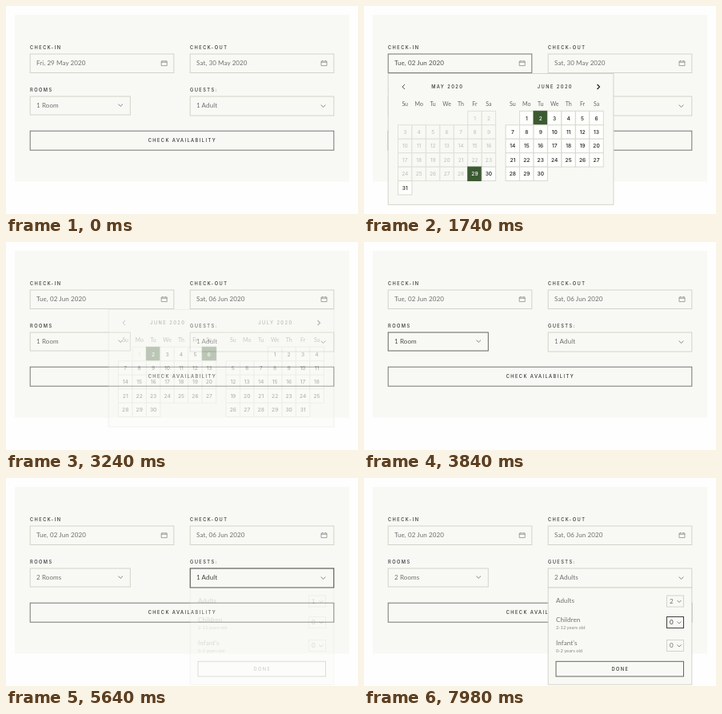
Write an HTML page that moves like this. It is 440 by 260 pixels and loops after 8000 ms.

```html
<!DOCTYPE html>
<html lang="en">
<head>
<meta charset="utf-8">
<title>Booking form</title>
<style>
html, body { margin: 0; width: 100%; height: 100%; overflow: hidden; background: #fefefe; }
svg { display: block; width: 100vw; height: 100vh; font-family: Lato, "Open Sans", sans-serif; }
.cap { font: 500 5.7px Inter, sans-serif; letter-spacing: 1.45px; fill: #333; }
.val { font-size: 8px; letter-spacing: .1px; fill: #707070; }
.sub { font-size: 5.8px; fill: #8a8a86; }
.wk { font-size: 7px; fill: #666; }
.day { font: 500 6.6px Inter, sans-serif; fill: #222; }
.off { font-weight: 400; fill: #bdbeb8; }
</style>
</head>
<body>
<svg id="stage" viewBox="0 0 440 260"></svg>
<script>
const LOOP = 8000;
const PAPER = '#f8f9f4', LINE = '#d2d4cb';
const GREEN = [59, 90, 49], WHITE = [254, 254, 252], GREY = [112, 112, 112];
const stage = document.getElementById('stage');

function el(parent, tag, attrs = {}, text) {
  const n = document.createElementNS('http://www.w3.org/2000/svg', tag);
  for (const k in attrs) n.setAttribute(k, attrs[k]);
  if (text !== undefined) n.textContent = text;
  parent.appendChild(n);
  return n;
}
const group = () => el(stage, 'g');
const box = (p, x, y, width, height, fill = PAPER, stroke = LINE) =>
  el(p, 'rect', { x, y, width, height, fill, stroke });
const label = (p, x, y, cls, s, anchor = 'start') =>
  el(p, 'text', { x, y, class: cls, 'text-anchor': anchor }, s);
const line = (p, d, stroke = '#777', width = .9) =>
  el(p, 'path', { d, fill: 'none', stroke, 'stroke-width': width });
const chevron = (p, x, y, r = 2.8) => line(p, `M${x - r} ${y - r / 2}l${r} ${r}l${r} ${-r}`);

function calIcon(x, y) {
  line(stage, `M${x} ${y}h7v5.6h-7zM${x} ${y + 1.3}h7M${x + 1.5} ${y - 1}v1M${x + 5.5} ${y - 1}v1`, '#808080', .7);
}

const mix = (a, b, k) => `rgb(${a.map((v, i) => Math.round(v + (b[i] - v) * k))})`;
const ramp = (t, from, to) => {
  const k = Math.min(1, Math.max(0, (t - from) / (to - from)));
  return k * k * (3 - 2 * k);
};
const pulse = (t, on, off, rise = 180, fall = rise) =>
  ramp(t, on, on + rise) - ramp(t, off, off + fall);

function show(n, k) {
  n.setAttribute('opacity', k.toFixed(3));
  n.setAttribute('visibility', k > 0 ? 'visible' : 'hidden');
}
function focus(f, k) {
  f.frame.setAttribute('stroke', mix([210, 212, 203], [64, 64, 64], k));
  f.text.style.fill = mix(GREY, [64, 64, 64], k);
}
const setText = (n, s) => { if (n.textContent !== s) n.textContent = s; };

function field(x, y, w, h, name) {
  label(stage, x, y - 6, 'cap', name);
  return { frame: box(stage, x + .2, y, w - .4, h), text: label(stage, x + 8, y + 14.1, 'val', '') };
}

// Two months side by side; returns the day cells by "month-day".
function calendar(x, rows, months) {
  const g = group(), cells = {}, step = 17.45;
  box(g, x + .2, 84.4, 281.7, rows * step + 59.2);
  line(g, `M${x + 21} 98l-3 3l3 3`, '#444');
  line(g, `M${x + 261.5} 98l3 3l-3 3`, '#222', 1.2);
  months.forEach((m, side) => {
    const x0 = x + 12.5 + side * 134.6;
    label(g, x0 + 61.8, 103.4, 'cap', m.name + ' 2020', 'middle');
    ['Su', 'Mo', 'Tu', 'We', 'Th', 'Fr', 'Sa'].forEach((d, i) =>
      label(g, x0 + (i + .5) * step, 124.8, 'wk', d, 'middle'));
    for (let d = 1; d <= m.days; d++) {
      const at = d - 1 + m.first, off = d < m.open;
      const cx = x0 + at % 7 * step, cy = 131.3 + Math.floor(at / 7) * step;
      cells[side + '-' + d] = {
        rect: box(g, cx, cy, step, step, off ? PAPER : mix(WHITE, GREEN, 0), off ? '#dfe0d8' : '#d8dad1'),
        text: label(g, cx + step / 2, cy + 11.2, off ? 'day off' : 'day', d, 'middle')
      };
    }
  });
  return { g, cells };
}

function tint(cell, k) {
  cell.rect.setAttribute('fill', mix(WHITE, GREEN, k));
  cell.rect.setAttribute('stroke', mix([216, 218, 209], GREEN, k));
  cell.text.style.fill = mix([34, 34, 34], [255, 255, 255], k);
}

// Open list of seven options, 14 px each.
function list(x, y, w, pad, options) {
  const g = group();
  box(g, x, y, w, 97.7, '#fefefd', '#c9cbc2');
  const rows = options.map((s, i) => ({
    rect: el(g, 'rect', { x: x + .5, y: y + .3 + i * 14, width: w - 1, height: 14 }),
    text: label(g, x + pad, y + 10 + i * 14, 'val', s)
  }));
  el(g, 'rect', { x: x + w - 2, y: y + .5, width: 2, height: 66, fill: '#a9aaa5' });
  return { g, rows };
}

function paintList(l, hover) {
  l.rows.forEach((r, i) => {
    const k = i === 0 ? 1 : i === 1 ? hover : 0;
    r.rect.setAttribute('fill', mix(WHITE, GREEN, k));
    r.text.style.fill = mix(GREY, [255, 255, 255], k);
  });
}

// Form
el(stage, 'rect', { width: 440, height: 260, fill: '#fefefe' });
el(stage, 'rect', { x: 11, y: 11, width: 418, height: 208.5, fill: PAPER });
const checkIn = field(30, 60, 180, 23.5, 'CHECK-IN');
const checkOut = field(230, 60, 180, 23.5, 'CHECK-OUT');
const rooms = field(30, 113, 125.5, 23, 'ROOMS');
const guests = field(230, 113, 180, 24, 'GUESTS:');
calIcon(194.2, 69);
calIcon(394, 69);
chevron(stage, 143.2, 124);
chevron(stage, 396.5, 125);
box(stage, 30.2, 156.2, 379.6, 24, PAPER, '#777');
label(stage, 220.4, 170.4, 'cap', 'CHECK AVAILABILITY', 'middle');

// Overlays
const may = { name: 'MAY', days: 31, first: 5, open: 29 };
const june = { name: 'JUNE', days: 30, first: 1, open: 1 };
const july = { name: 'JULY', days: 31, first: 3, open: 1 };
const calIn = calendar(30, 6, [may, june]);
const calOut = calendar(128, 5, [{ ...june, open: 2 }, july]);
tint(calIn.cells['0-29'], 1);
tint(calOut.cells['0-2'], 1);

const numbers = [1, 2, 3, 4, 5, 6, 7];
const roomList = list(30.2, 136, 125.1, 8, numbers.map(n => n + (n > 1 ? ' Rooms' : ' Room')));

const guestBox = group();
box(guestBox, 230.2, 137, 179.6, 121.2);
const [adults, children] = [['Adults', '', 147], ['Children', '2-12 years old', 173.5], ['Infant\'s', '0-2 years old', 202.5]]
  .map(([name, note, y]) => {
    label(guestBox, 240, y + (note ? 6.4 : 9.4), 'val', name);
    label(guestBox, 240, y + 15.4, 'sub', note);
    const frame = box(guestBox, 378.5, y, 21, 14);
    const text = label(guestBox, 382, y + 9.9, 'val', '0');
    chevron(guestBox, 394, y + 7.2, 2.5);
    return { frame, text };
  });
box(guestBox, 240, 229.3, 159.5, 18.7, PAPER, '#666');
label(guestBox, 320.4, 240.8, 'cap', 'DONE', 'middle');
const adultList = list(378.5, 161, 21, 4, numbers);

function render(t) {
  setText(checkIn.text, t < 1740 ? 'Fri, 29 May 2020' : 'Tue, 02 Jun 2020');
  setText(checkOut.text, t < 2040 ? 'Sat, 30 May 2020' : t < 3000 ? 'Tue, 02 Jun 2020' : 'Sat, 06 Jun 2020');
  setText(rooms.text, t < 4840 ? '1 Room' : '2 Rooms');
  setText(guests.text, t < 7260 ? '1 Adult' : '2 Adults');
  setText(adults.text, t < 7260 ? '1' : '2');

  focus(checkIn, pulse(t, 40, 1700, 200, 100));
  focus(checkOut, pulse(t, 2020, 3000));
  focus(rooms, pulse(t, 3720, 4230));
  focus(guests, pulse(t, 5140, 6360, 200));
  focus(adults, pulse(t, 6400, 7440));
  focus(children, ramp(t, 7740, 7940));

  show(calIn.g, pulse(t, 580, 2020, 220, 160));
  tint(calIn.cells['1-2'], ramp(t, 1400, 1560));

  show(calOut.g, pulse(t, 2080, 3040, 220, 320));
  tint(calOut.cells['0-4'], pulse(t, 2270, 2620));
  tint(calOut.cells['0-5'], pulse(t, 2640, 2780, 160));
  tint(calOut.cells['0-6'], ramp(t, 2780, 2940));

  show(roomList.g, pulse(t, 4040, 4780));
  paintList(roomList, ramp(t, 4260, 4420));

  show(guestBox, ramp(t, 5550, 5850));
  show(adultList.g, pulse(t, 6720, 7240));
  paintList(adultList, ramp(t, 6940, 7100));
}

const start = performance.now();
function tick() {
  render((performance.now() - start) % LOOP);
  requestAnimationFrame(tick);
}
tick();
</script>
</body>
</html>
```
